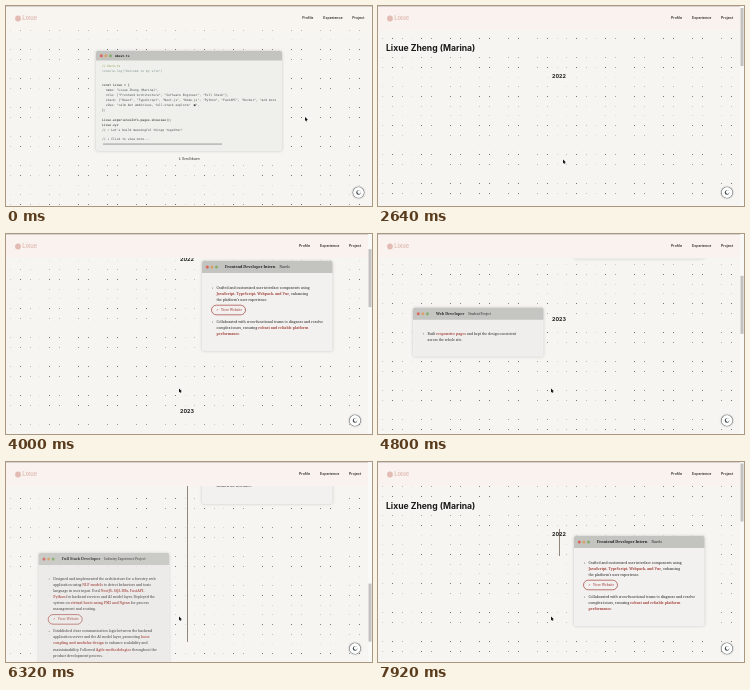
Animation, 366 px wide and 200 px high, one loop 8000 ms. Source, as an HTML page with a canvas:

```html
<!DOCTYPE html>
<html lang="en">
<head>
<meta charset="utf-8">
<title>Portfolio timeline</title>
<style>
  html, body { margin: 0; overflow: hidden; background: #f6f5f1; }
  canvas { display: block; }
</style>
</head>
<body>
<canvas id="stage" width="366" height="200"></canvas>
<script>
const ctx = document.getElementById('stage').getContext('2d');
const LOOP = 8000, PAGE_AT = 2560;
const SANS = 'Inter, sans-serif', SERIF = '"Noto Serif", serif', MONO = '"DejaVu Sans Mono", monospace';
const INK = '#1c1a19', BODY = '#262322', CODE = '#454a48', RED = '#a2403a';

const clamp = v => Math.min(1, Math.max(0, v));
const smooth = p => p * p * (3 - 2 * p);
const linear = p => p;

// Eased value at time t from [time, value] stops
function track(stops, t) {
  if (t <= stops[0][0]) return stops[0][1];
  for (let i = 1; i < stops.length; i++) {
    const [t0, a] = stops[i - 1], [t1, b, ease = smooth] = stops[i];
    if (t < t1) return a + (b - a) * ease((t - t0) / (t1 - t0));
  }
  return stops[stops.length - 1][1];
}

const scrollStops = [[3600, 2], [4000, 47], [4160, 47], [5440, 231, linear], [6320, 414, linear],
  [7040, 456, p => 1 - (1 - p) ** 2], [7100, 456], [7800, 0]];
const lineStops = [[5440, 200], [6320, 594, linear], [7040, 624], [7200, 624], [7920, 94], [8000, 80]];
const cursorX = [[240, 299], [1280, 323], [2080, 323], [2400, 185], [3680, 185], [4000, 173]];
const cursorY = [[240, 111], [1280, 14], [2080, 14], [2400, 153.5], [3680, 153.5], [4000, 154.5]];

const years = [['2022', 72], ['2023', 224.5], ['2024', 384.7], ['2025', 628.5]];
const agile = start => [
  [start, 'Established clear communication logic between the backend', 1],
  [start + 6, 'application server and the AI model layer, promoting *loose'],
  [start + 12, '*coupling and modular design* to enhance scalability and'],
  [start + 18.5, 'maintainability. Followed *Agile methodologies* throughout the'],
  [start + 24.5, 'product development process.']
];
// Each line: offset from the card top, text (*bold*), bullet flag
const cards = [
  { x: 196, y: 74, h: 90, side: 1, at: 2800, title: 'Frontend Developer Intern', note: 'Nuvelo', buttons: [49], lines: [
    [27, 'Crafted and customized user interface components using', 1],
    [33, '*JavaScript, TypeScript, Webpack, and Vue*, enhancing'],
    [39, 'the platform’s user experience.'],
    [61, 'Collaborated with cross-functional teams to diagnose and resolve', 1],
    [67, 'complex issues, ensuring *robust and reliable platform'],
    [73, '*performance*.']] },
  { x: 36, y: 213, h: 49, side: -1, at: 4300, title: 'Web Developer', note: 'Student Project', buttons: [], lines: [
    [26, 'Built *responsive pages* and kept the design consistent', 1],
    [32, 'across the whole site.']] },
  { x: 196, y: 311, h: 145, side: 1, at: 4960, title: 'Summer Research Intern', note: 'Research Lab', buttons: [63, 118], lines: [
    [25.5, 'Improved a language-based platform for *visualizing algorithms*,', 1],
    [31.5, 'using *TypeScript, React and Next*, easing users’ ability to'],
    [37.5, 'design and explore their algorithms.'],
    [46, 'Designed new features for *explaining search trees*, helping', 1],
    [52, 'users understand specific parts of decisions.'],
    [75, 'Implemented a new component for *variable tracking* in the', 1],
    [81, 'visualization, showing the distribution and change of value over'],
    [87, 'time.'],
    [95, 'Integrated *an event-validation with breakpoints* to', 1],
    [101, 'automatically validate selections, exploring complex issues'],
    [107, 'that users want to monitor.'],
    [127, 'Refined the interface.']] },
  { x: 36, y: 505, h: 153, side: -1, at: 5960, title: 'Full Stack Developer', note: 'Industry Experience Project', buttons: [66.5], lines: [
    [26, 'Designed and implemented the architecture for a forestry web', 1],
    [32, 'application using *NLP models* to detect behaviors and toxic'],
    [38, 'language in user input. Used *NestJS, SQL DBs, FastAPI,'],
    [44, '*Python* for backend services and AI model layer. Deployed the'],
    [50, 'system on *virtual hosts using PM2 and Nginx* for process'],
    [56, 'management and routing.'],
    ...agile(78.5), ...agile(111)] }
];

const code = [
  [60, '// Hero.ts', '#879a45'],
  [65, 'console.log("Welcome to my site")', '#7d918b'],
  [79, 'const Lixue = {'],
  [84, '  name: "Lixue Zheng (Marina)",', CODE],
  [89, '  role: ["Frontend Architecture", "Software Engineer", "Full Stack"],', CODE],
  [94, '  stack: ["React", "TypeScript", "Next.js", "Node.js", "Python", "FastAPI", "Docker", "and more"],', CODE],
  [99, '  vibe: "calm but ambitious, full-stack explorer  ■",', CODE],
  [104, '};'],
  [114, 'Lixue.experienceInfo.pages.showcase();'],
  [119, 'Lixue.xyz'],
  [124, '// ✓ Let\'s build meaningful things together!', CODE],
  [133, '// ↓ Click to view more...', CODE]
];

function rect(x, y, w, h, color) {
  ctx.fillStyle = color;
  ctx.fillRect(x, y, w, h);
}
function disc(x, y, r, color) {
  ctx.fillStyle = color;
  ctx.beginPath();
  ctx.arc(x, y, r, 0, 7);
  ctx.fill();
}
function text(str, x, y, font, color = INK, align = 'left') {
  ctx.font = font;
  ctx.fillStyle = color;
  ctx.textAlign = align;
  ctx.fillText(str, x, y);
  return ctx.measureText(str).width;
}
function rich(str, x, y) {
  str.split('*').forEach((part, i) => {
    x += text(part, x, y, `${i % 2 ? 700 : 400} 3.45px ${SERIF}`, i % 2 ? RED : BODY);
  });
}

// Window frame with soft shadow, title bar and three lights
function panel(x, y, w, h, bar, body) {
  ctx.save();
  ctx.shadowColor = 'rgba(60,60,70,.25)';
  ctx.shadowBlur = 3;
  ctx.fillStyle = body;
  ctx.beginPath();
  ctx.roundRect(x, y, w, h, 2);
  ctx.fill();
  ctx.restore();
  ctx.fillStyle = '#c3c3c0';
  ctx.beginPath();
  ctx.roundRect(x, y, w, bar, [2, 2, 0, 0]);
  ctx.fill();
  ['#d9655c', '#d9a066', '#86ad6c'].forEach((c, i) => disc(x + 5.3 + i * 4.6, y + bar / 2, 1.5, c));
}

// Tiny dots on a fine grid: each shows only as far as it meets a pixel centre
function drawDots(scroll) {
  const pitch = 9.683, first = 4.84;
  const strength = v => clamp((0.42 - Math.abs(v - Math.floor(v) - 0.5)) / 0.25);
  const top = first - scroll % pitch;
  for (let y = top; y < 200; y += pitch)
    for (let x = first; x < 356; x += pitch) {
      ctx.globalAlpha = strength(x) * strength(y);
      rect(Math.floor(x), Math.floor(y), 1, 1, '#77746f');
    }
  ctx.globalAlpha = 1;
}

function drawHero() {
  panel(90, 45, 186, 100, 9.5, '#eff0ec');
  text('About.ts', 109, 50, `700 3px ${MONO}`);
  ctx.save();
  ctx.beginPath();
  ctx.rect(96, 55, 174, 88);
  ctx.clip();
  for (const [y, str, color] of code) text(str, 96, y, `3.05px ${MONO}`, color);
  ctx.restore();
  rect(97, 137.3, 119, 1.6, '#b9bab8');
  text('↓ Scroll down', 183, 153, `3.2px ${SANS}`, BODY, 'center');
}

function drawCard(card, t) {
  const p = clamp((t - card.at) / 800);
  if (!p) return;
  const rest = (1 - p) ** 3, { y } = card;
  ctx.save();
  ctx.globalAlpha = 1 - rest;
  ctx.translate(card.x + card.side * 20 * rest, 0);
  panel(0, y, 130.5, card.h, 12, '#f2f1ef');
  const w = text(card.title, 23, y + 6, `700 3.7px ${SERIF}`);
  text(card.note, 23 + w + 4, y + 6, `500 3.1px ${SERIF}`, BODY);
  for (const [dy, str, bullet] of card.lines) {
    if (bullet) disc(10.5, y + dy, 0.5, '#77716d');
    rich(str, 14.5, y + dy);
  }
  for (const dy of card.buttons) {
    ctx.strokeStyle = RED;
    ctx.lineWidth = 0.7;
    ctx.beginPath();
    ctx.roundRect(9.5, y + dy - 4.8, 34, 9.6, 4.8);
    ctx.stroke();
    text('↗', 14, y + dy, '3px "DejaVu Sans", sans-serif', RED);
    text('View Website', 19, y + dy, `3.3px ${SERIF}`, RED);
  }
  ctx.restore();
}

function drawPage(t, scroll) {
  ctx.save();
  ctx.translate(0, -scroll);
  text('Lixue Zheng (Marina)', 8, 44.3, `700 8.6px ${SANS}`);
  if (t > 5440) rect(181, 67, 1, track(lineStops, t) - 67, '#92857c');
  for (const [label, y] of years) text(label, 181, y, `700 5.4px ${SANS}`, INK, 'center');
  for (const card of cards) drawCard(card, t);
  ctx.restore();
}

function drawNav(onPage) {
  const shift = onPage ? 0 : 3.3;
  rect(0, 0, 366, 24, onPage ? '#f9f2ee' : '#f8f4f0');
  rect(0, 0, 366, 0.8, '#cfcbc8');
  disc(12, 12.5, 2.9, '#e2bbb4');
  text('Lixue', 16.3, 12.8, `700 5.6px ${SANS}`, '#e2bfb8');
  [['Profile', 293], ['Experience', 314], ['Project', 343]].forEach(([label, x]) =>
    text(label, x + shift, 12, `500 3.6px ${SANS}`));
}

function drawThemeButton(x) {
  ctx.save();
  ctx.shadowColor = 'rgba(0,0,0,.4)';
  ctx.shadowBlur = 2;
  disc(x, 186.5, 5.8, '#59606b');
  ctx.restore();
  disc(x, 186.5, 5.4, '#fdfdfc');
  disc(x, 186.5, 2.2, '#3c4450');
  disc(x + 0.6, 186.1, 1.8, '#fdfdfc');
}

function drawCursor(x, y) {
  ctx.beginPath();
  [[0, 0], [0, 4], [1, 3.2], [1.7, 4.6], [2.3, 4.3], [1.7, 2.9], [2.9, 2.8]]
    .forEach(([dx, dy]) => ctx.lineTo(x + dx, y + dy));
  ctx.closePath();
  ctx.fillStyle = '#111';
  ctx.fill();
}

function draw(now) {
  const t = now % LOOP, onPage = t >= PAGE_AT, scroll = track(scrollStops, t);
  ctx.textBaseline = 'middle';
  rect(0, 0, 366, 200, '#f6f5f1');
  drawDots(onPage ? scroll - 0.5 : 0);
  if (onPage) drawPage(t, scroll);
  else drawHero();
  drawNav(onPage);
  drawThemeButton(onPage ? 349 : 352.5);
  if (onPage) {
    rect(362, 0, 4, 200, '#f8f8f7');
    rect(362.5, 1.5 + scroll * 0.29, 3, 58, '#c3c2c1');
  }
  drawCursor(track(cursorX, t), track(cursorY, t));
  requestAnimationFrame(draw);
}
requestAnimationFrame(draw);
</script>
</body>
</html>
```
